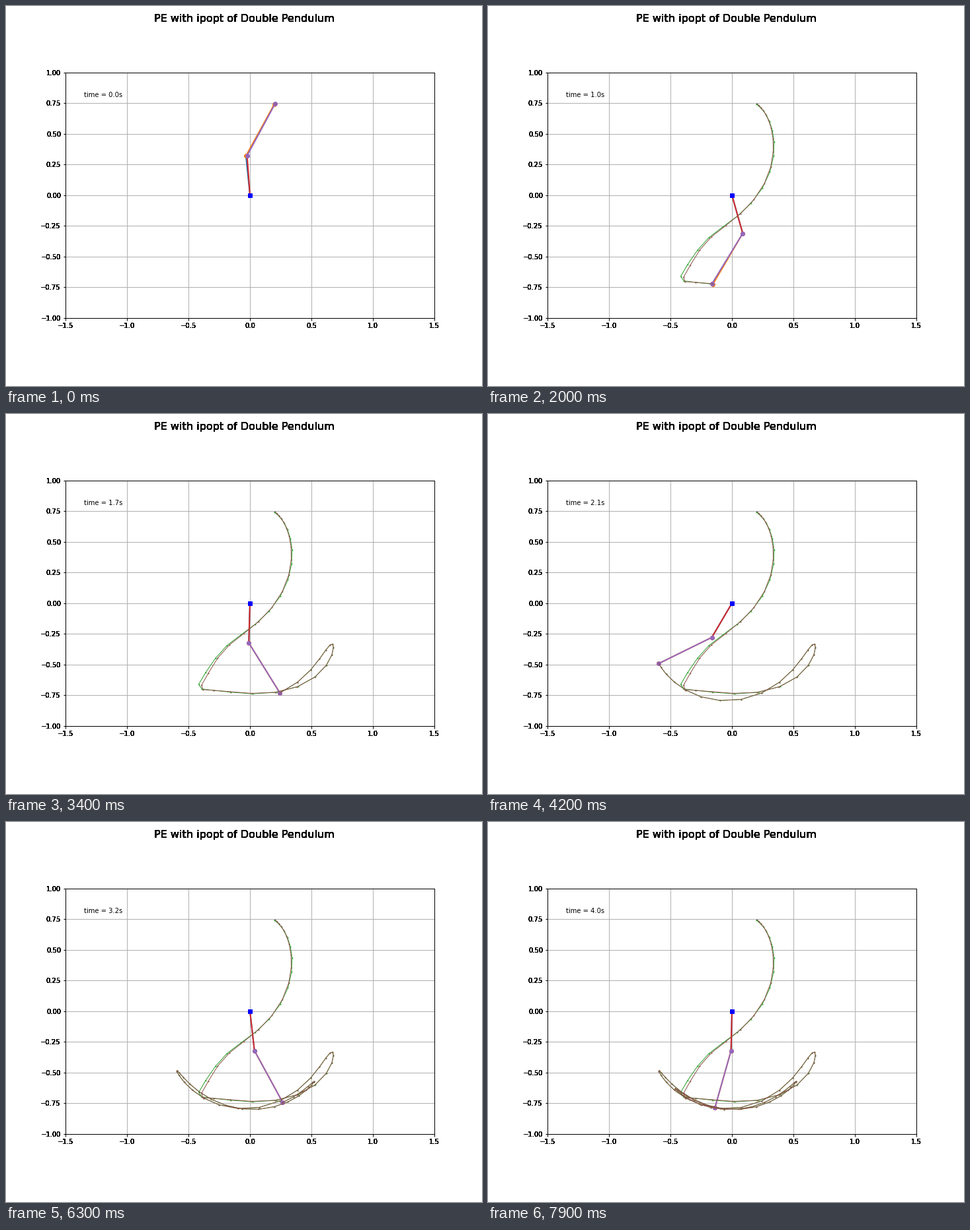
Write a matplotlib script that moves like this. It is 720 px wide and 576 px high and loops after 8000 ms.

```python
import matplotlib.pyplot as plt
import numpy as np
from matplotlib.animation import FuncAnimation

FRAMES, DT = 80, 0.05
L1, L2 = 0.323, 0.480
HALF_SWING = 14.95  # steps per half oscillation

# Key poses of the first fall: step, upper angle, lower angle.
# Angles are measured from straight down, positive to the right.
FALL = np.array([
    (0, -3.07, 2.648), (4, -2.95, 2.37), (8, -2.694, 1.707),
    (12, -2.31, 0.70), (14, -1.961, 0.279), (16, -1.287, -0.059),
    (18, -0.41, -0.555), (20, 0.275, -0.548), (22, 0.706, -0.011),
    (25, 0.80, 0.94), (28, 0.66, 1.407), (32, 0.223, 1.076),
    (36, -0.25, -0.035),
])


def settle(t, zero, stiff, drag):
    """Oscillation with hyperbolically shrinking amplitude."""
    return -np.sin(np.pi * (t - zero) / HALF_SWING) / (stiff + drag * (t - 36))


def spline(t, y, x):
    """Natural cubic spline through (t, y), evaluated at x."""
    h, n = np.diff(t), len(t)
    a, rhs = np.eye(n), np.zeros(n)
    for k in range(1, n - 1):
        a[k, k - 1:k + 2] = h[k - 1], 2 * (h[k - 1] + h[k]), h[k]
        rhs[k] = 6 * ((y[k + 1] - y[k]) / h[k] - (y[k] - y[k - 1]) / h[k - 1])
    m = np.linalg.solve(a, rhs)
    k = np.clip(np.searchsorted(t, x) - 1, 0, n - 2)
    hk, p, q = h[k], t[k + 1] - x, x - t[k]
    return ((m[k] * p**3 + m[k + 1] * q**3) / (6 * hk)
            + (y[k] / hk - m[k] * hk / 6) * p
            + (y[k + 1] / hk - m[k + 1] * hk / 6) * q)


late = np.arange(40.0, FRAMES + 2)
knots = np.append(FALL[:, 0], late)
upper_keys = np.append(FALL[:, 1], settle(late, 34.5, 1.685, 0.0325))
lower_keys = np.append(FALL[:, 2], settle(late, 35.84, 0.80, 0.0108))


def pendulum(step, lead=0.0, tilt=0.0):
    """Elbow and tip positions; the lower arm may run ahead by lead."""
    a = spline(knots, upper_keys, step) + tilt
    b = spline(knots, lower_keys, step + lead)
    elbow = L1 * np.column_stack([np.sin(a), -np.cos(a)])
    return elbow, elbow + L2 * np.column_stack([np.sin(b), -np.cos(b)])


steps = np.arange(FRAMES, dtype=float)
measured = pendulum(steps, 0.33 * np.exp(-((steps - 9) / 10.5) ** 2),
                    0.03 * np.exp(-steps / 3))
estimate = pendulum(steps)

plt.rcParams["font.family"] = "DejaVu Sans"
fig, ax = plt.subplots(figsize=(10, 8), dpi=72)
fig.subplots_adjust(left=0.125, right=0.9, bottom=0.102, top=0.902)
ax.set(xlim=(-1.5, 1.5), ylim=(-1, 1), aspect="equal",
       xticks=np.linspace(-1.5, 1.5, 7), yticks=np.linspace(-1, 1, 9))
ax.grid(color="#b0b0b0", lw=1)
ax.tick_params(width=1, length=3.5, labelbottom=False, labelleft=False)
for spine in ax.spines.values():
    spine.set_linewidth(1)


def label(value, digits, pos, shift, ha, va):
    text = f"{value:.{digits}f}".replace("-", "\u2212")
    ax.annotate(text, pos, shift, textcoords="offset points", size=10,
                ha=ha, va=va)


# Static text is layered, which hardens its edges.
for _ in range(10):
    fig.text(0.5, 0.98, "PE with ipopt of Double Pendulum", size=16,
             ha="center", va="top")
    for x in ax.get_xticks():
        label(x, 1, (x, -1), (0, -7), "center", "top")
    for y in ax.get_yticks():
        label(y, 2, (-1.5, y), (-7, 0), "right", "center_baseline")


def make_lines(first):
    upper, = ax.plot([], [], "-", color=f"C{first}", lw=2)
    lower, = ax.plot([], [], "o-", color=f"C{first + 1}", lw=2, ms=6)
    trail, = ax.plot([], [], "o-", color=f"C{first + 2}", lw=1, ms=1)
    return upper, lower, trail


arms = [(make_lines(0), measured), (make_lines(3), estimate)]
pivot, = ax.plot([0], [0], "s", color="blue", ms=6)
clock = ax.text(0.05, 0.9, "", size=10, transform=ax.transAxes)


def update(i):
    for (upper, lower, trail), (elbow, tip) in arms:
        upper.set_data([0, elbow[i, 0]], [0, elbow[i, 1]])
        lower.set_data(*np.array([elbow[i], tip[i]]).T)
        trail.set_data(*tip[:i + 1].T)
    clock.set_text(f"time = {i * DT:.1f}s")
    return [line for lines, _ in arms for line in lines] + [pivot, clock]


anim = FuncAnimation(fig, update, frames=FRAMES, interval=100, repeat=True)
plt.show()
```
